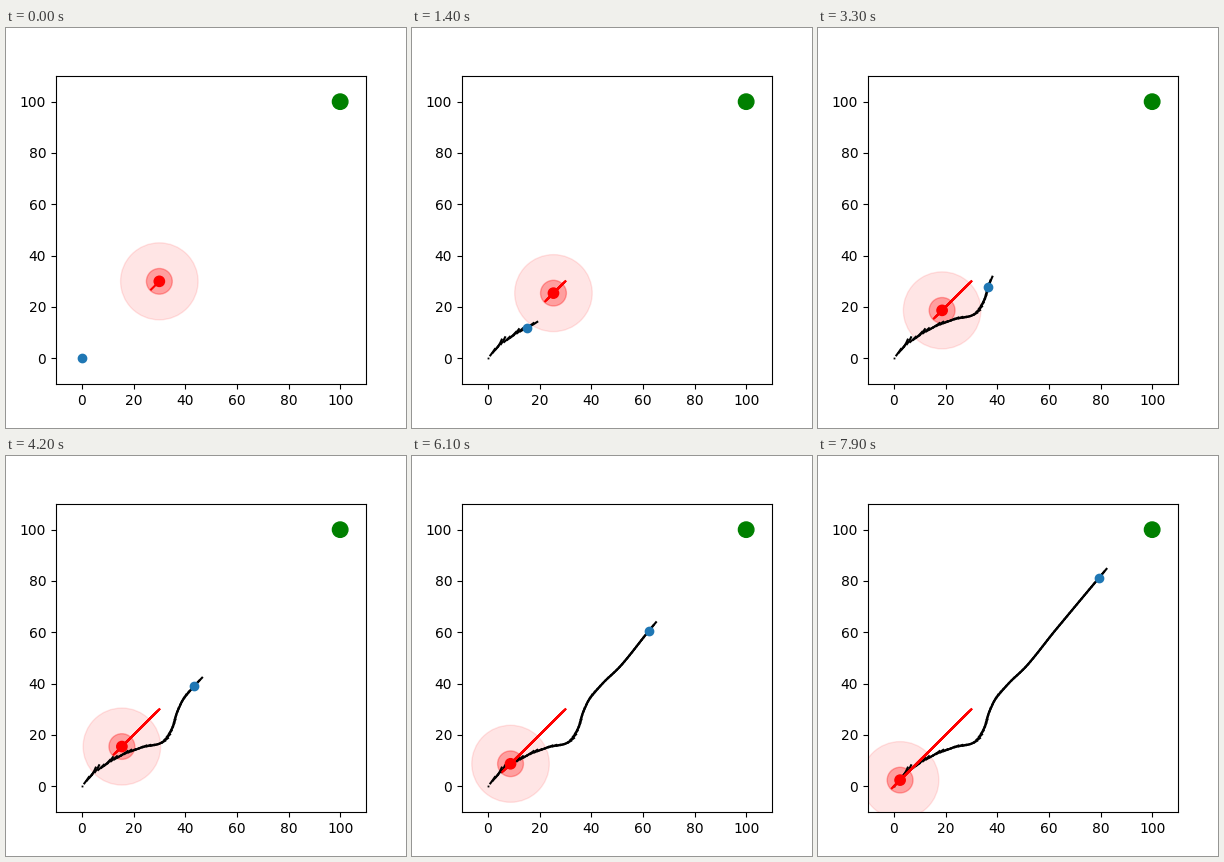
A matplotlib script that plays this animation: 400x400 px, repeating every 8 s.

```python
import numpy as np
import matplotlib.pyplot as plt
from matplotlib.animation import FuncAnimation

FRAMES = 80
SPEED = 1.5                # agent travel per frame
DRIFT = 0.5 / np.sqrt(2)   # obstacle travel per frame on each axis
AHEAD = np.arange(1, 4)    # agent planning horizon, in frames
PULL = 0.5                 # how far a plan keeps to the current heading

ROUTE = np.array([
    (0, 0), (4, 4.4), (9, 8.2), (15, 11.8), (23, 15), (31, 17.3),
    (34.3, 21.5), (36.4, 27.4), (38.6, 32.6), (43.4, 38.9),
    (50.4, 45.9), (62.2, 60.4), (79.4, 81.2), (82.9, 85.4)])
KNOTS = np.r_[0, np.cumsum(np.hypot(*np.diff(ROUTE, axis=0).T))]
SLOPES = np.gradient(ROUTE, KNOTS, axis=0)


def route(s):
    """Hermite curve through the route at distance s, with its tangent."""
    s = np.clip(s, 0, KNOTS[-1])
    i = np.clip(np.searchsorted(KNOTS, s, "right") - 1, 0, len(KNOTS) - 2)
    h = (KNOTS[i + 1] - KNOTS[i])[:, None]
    t = (s - KNOTS[i])[:, None] / h
    a, b = ROUTE[i], ROUTE[i + 1]
    u, v = h * SLOPES[i], h * SLOPES[i + 1]
    c, d = 3 * (b - a) - 2 * u - v, 2 * (a - b) + u + v
    return a + t * (u + t * (c + t * d)), (u + t * (2 * c + t * 3 * d)) / h


def agent(n):
    """Position and heading; the agent waits one frame before it starts."""
    return route(SPEED * np.maximum(np.atleast_1d(n) - 1, 0))


def agent_plan(n):
    """Upcoming positions with a sway to the left that dies out."""
    start, heading = agent(n)
    heading /= np.hypot(*heading[0])
    k = AHEAD[:, None]
    straight = start + SPEED * k * heading
    pts = (1 - PULL) * agent(n + AHEAD)[0] + PULL * straight
    left = heading[:, ::-1] * (-1, 1)
    sway = 0.8 * n * np.exp(-n / 4.5) * np.cos(np.pi * n / 4.5) ** 2
    return pts + left * sway * (k / AHEAD[-1]) ** 2


def obstacle(n):
    return 30 - DRIFT * max(n - 1, 0)


fig, ax = plt.subplots(figsize=(4, 4), dpi=100)
ax.set_xlim(-10, 110)
ax.set_ylim(-10, 110)


def disc(center, radius, color, **style):
    return ax.add_patch(plt.Circle((center, center), radius,
                                   color=color, **style))


disc(100, 3, "g")
threat = [disc(30, 15, "r", alpha=0.1), disc(30, 5, "r", alpha=0.3),
          disc(30, 2, "r", zorder=3)]
robot = ax.scatter(0, 0, s=36, c="C0", zorder=3)
ax.plot(0, 0, "ks", ms=1.3, mew=0)

# Each frame's plans stay for the rest of the loop
plans = []
for n in range(FRAMES):
    ends = [obstacle(n), obstacle(n) - 9 * DRIFT]
    lines = ax.plot(*agent_plan(n).T, "k", lw=1.5) if n else []
    plans.append(lines + ax.plot(ends, ends, "r", lw=1.5))


def update(n):
    for i, lines in enumerate(plans):
        for line in lines:
            line.set_visible(i <= n)
    for patch in threat:
        patch.center = (obstacle(n), obstacle(n))
    robot.set_offsets(agent(n)[0])
    return []


anim = FuncAnimation(fig, update, frames=FRAMES, interval=100,
                     repeat=True, repeat_delay=0)
plt.show()
```
